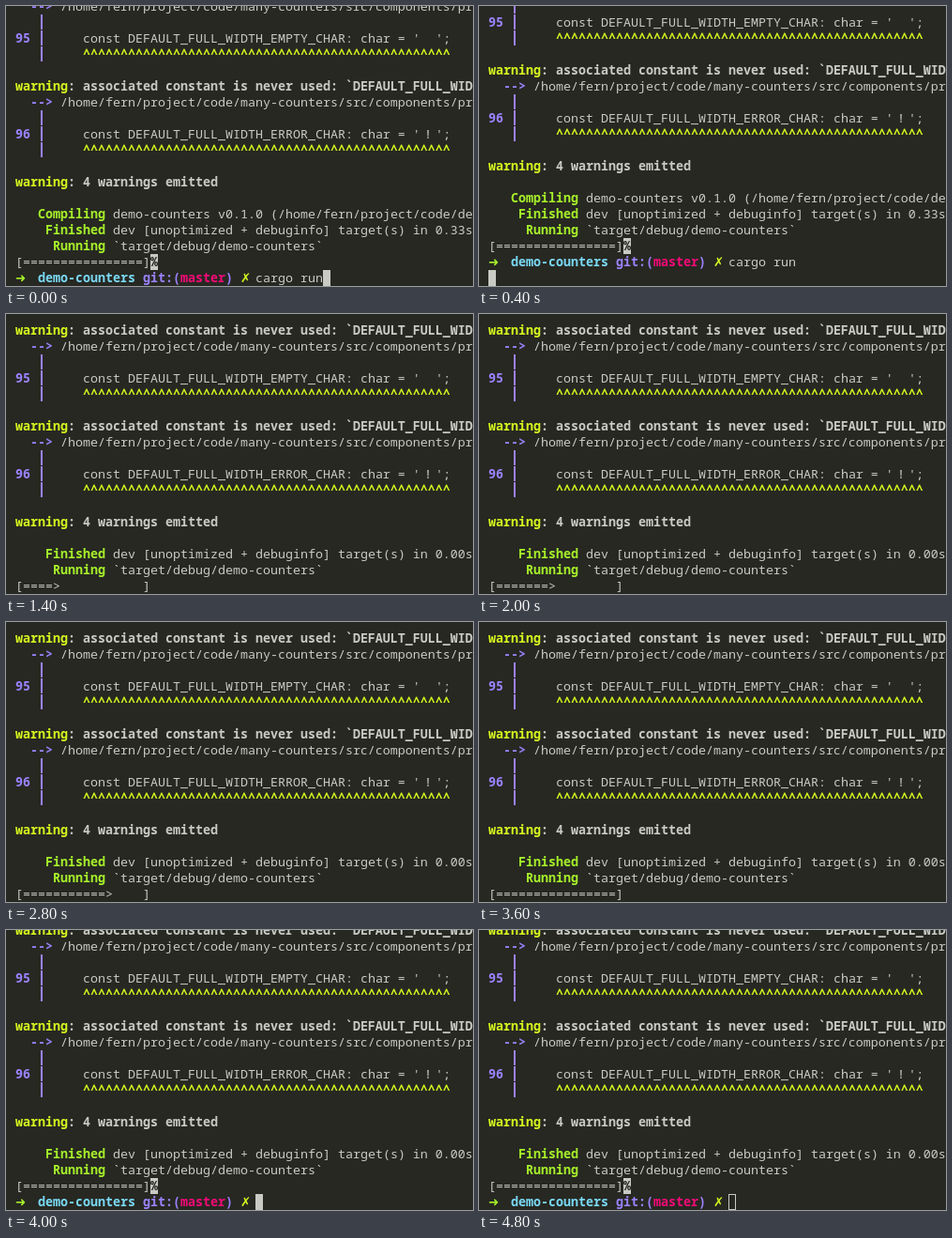
These frames come from a looping animation (498x298 px, 4.9 s). An HTML page:

```html
<!DOCTYPE html>
<html lang="en">
<head>
<meta charset="utf-8">
<title>Terminal progress bar</title>
<style>
  html, body { margin: 0; width: 100%; height: 100%; overflow: hidden; background: #272822; }
  svg { display: block; }
  text { font: 13.3333px "Noto Sans Mono", "DejaVu Sans Mono", monospace; white-space: pre; }
  .bold { font-weight: 700; }
  .symbol { font-family: "DejaVu Sans", sans-serif; }
</style>
</head>
<body>
<svg id="terminal" width="498" height="298" viewBox="0 0 498 298"></svg>
<script>
const LOOP = 4900, CELL = 8, ROW = 17, LEFT = 10, BAR_SIZE = 16, LAST_ROW = 17;
const COLOR = {
  back: '#272822', white: '#cacac5', green: '#a6f02a', yellow: '#d6f71f',
  purple: '#9b82ff', cyan: '#7ad9f5', pink: '#f40a78'
};
const terminal = document.getElementById('terminal');

function add(tag, attrs, content = '') {
  const node = document.createElementNS('http://www.w3.org/2000/svg', tag);
  for (const name in attrs) node.setAttribute(name, attrs[name]);
  node.textContent = content;
  terminal.appendChild(node);
}

const cellX = col => LEFT + col * CELL;
const cellY = row => row * ROW - 8;

function write(row, col, content, color = 'white', style = '') {
  add('text', { x: cellX(col), y: row * ROW + 5, fill: COLOR[color], class: style }, content);
}

const bold = (row, col, content, color) => write(row, col, content, color, 'bold');

function block(row, col) {
  add('rect', { x: cellX(col), y: cellY(row), width: CELL, height: ROW, fill: COLOR.white });
}

function hollowBlock(row, col) {
  add('rect', {
    x: cellX(col) + 0.5, y: cellY(row) + 0.5, width: CELL - 1, height: ROW - 1,
    fill: 'none', stroke: COLOR.white
  });
}

function gutter(row) {
  add('rect', { x: cellX(3) + 3, y: cellY(row), width: 2, height: 16, fill: COLOR.purple });
}

function warning(row, line, kind, symbol) {
  bold(row, 0, 'warning', 'yellow');
  bold(row, 7, ': associated constant is never used: `DEFAULT_FULL_WID');
  bold(row + 1, 2, '-->', 'purple');
  write(row + 1, 6, '/home/fern/project/code/many-counters/src/components/pr');
  for (let i = 2; i <= 4; i++) gutter(row + i);
  bold(row + 3, 0, line, 'purple');
  write(row + 3, 9, `const DEFAULT_FULL_WIDTH_${kind}_CHAR: char = '`);
  write(row + 3, 54.5, symbol);
  write(row + 3, 56, "';");
  bold(row + 4, 9, '^'.repeat(49), 'yellow');
}

function warnings(row) {
  warning(row, '95', 'EMPTY', ' ');
  warning(row + 6, '96', 'ERROR', '!');
  bold(row + 12, 0, 'warning', 'yellow');
  bold(row + 12, 7, ': 4 warnings emitted');
}

function status(row, verb, detail) {
  bold(row, 12 - verb.length, verb, 'green');
  write(row, 13, detail);
}

function build(row, seconds) {
  status(row, 'Finished', `dev [unoptimized + debuginfo] target(s) in ${seconds}s`);
  status(row + 1, 'Running', '`target/debug/demo-counters`');
}

function progress(row, step) {
  const done = step >= BAR_SIZE - 1;
  const fill = done ? '='.repeat(BAR_SIZE) : '='.repeat(step) + '>';
  write(row, 0, `[${fill.padEnd(BAR_SIZE)}]`);
}

function finishedProgress(row) {
  progress(row, BAR_SIZE);
  block(row, 18);
  bold(row, 18, '%', 'back');
}

function prompt(row, command = '') {
  write(row, 0, '➜', 'green', 'bold symbol');
  bold(row, 3, 'demo-counters', 'cyan');
  bold(row, 17, 'git:(', 'purple');
  bold(row, 22, 'master', 'pink');
  bold(row, 28, ')', 'purple');
  write(row, 30, '✗', 'yellow', 'bold symbol');
  write(row, 32, command);
}

function previousRun(shift) {
  warnings(-1 - shift);
  status(13 - shift, 'Compiling', 'demo-counters v0.1.0 (/home/fern/project/code/de');
  build(14 - shift, '0.33');
  finishedProgress(16 - shift);
  prompt(17 - shift, 'cargo run');
}

function currentRun(shift) {
  warnings(1 - shift);
  build(15 - shift, '0.00');
}

function draw(time) {
  terminal.replaceChildren();
  if (time < 600) {
    const entered = time >= 400;
    previousRun(entered ? 1 : 0);
    block(LAST_ROW, entered ? 0 : 41);
  } else if (time < 3900) {
    currentRun(0);
    progress(LAST_ROW, Math.floor((time - 600) / 200));
  } else {
    currentRun(1);
    finishedProgress(LAST_ROW - 1);
    if (time < 4000) {
      block(LAST_ROW, 0);
    } else {
      prompt(LAST_ROW);
      (time < 4800 ? block : hollowBlock)(LAST_ROW, 32);
    }
  }
}

// Every change falls on a 100 ms tick, so redraw only when the tick moves on.
const start = performance.now();
let lastTick = -1;
function animate() {
  const tick = Math.floor(((performance.now() - start) % LOOP) / 100);
  if (tick !== lastTick) draw(tick * 100);
  lastTick = tick;
  requestAnimationFrame(animate);
}
animate();
</script>
</body>
</html>
```
